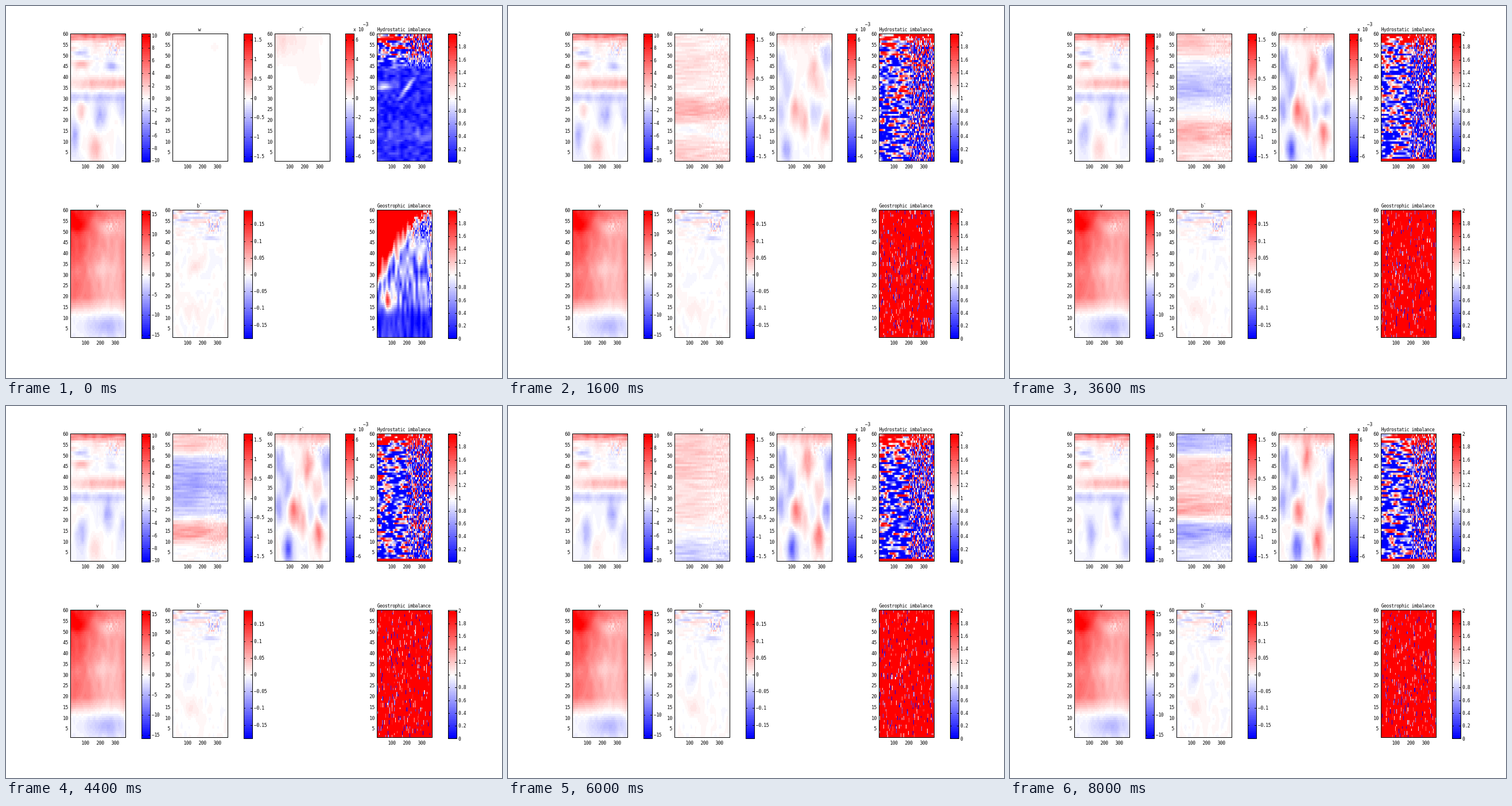
Write an HTML page with a canvas that moves like this. It is 864 px wide and 648 px high and loops after 8400 ms.

```html
<!DOCTYPE html>
<html lang="en">
<head>
<meta charset="utf-8">
<title>Model fields</title>
<style>
html, body { margin: 0; width: 100%; height: 100%; overflow: hidden; background: #fff; }
canvas { display: block; }
</style>
</head>
<body>
<canvas id="stage" width="864" height="648"></canvas>
<script>
const STEP = 400, COUNT = 21, W = 95, H = 59, TOP = 49, LOW = 356;
const ctx = document.getElementById('stage').getContext('2d');
const cell = document.createElement('canvas');
cell.width = W; cell.height = H;
const cellCtx = cell.getContext('2d');
const pixels = cellCtx.createImageData(W, H);

const clamp = (v, lo = -1, hi = 1) => Math.max(lo, Math.min(hi, v));
const ramp = (v, lo, hi) => clamp((v - lo) / (hi - lo), 0, 1);
const mix = (a, b, t) => a + (b - a) * t;
const bell = (d, r) => Math.exp(-((d / r) ** 2));
const bump = (dx, dy, rx, ry) => bell(dx, rx) * bell(dy, ry);

// Repeatable noise in -1..1
function hash(x, y, s) {
  let h = Math.imul(x, 374761393) ^ Math.imul(y, 668265263) ^ Math.imul(s + 1, 1274126177);
  h = Math.imul(h ^ (h >>> 13), 1103515245);
  h = Math.imul(h ^ (h >>> 15), 2246822519);
  return ((h ^ (h >>> 16)) >>> 0) / 2147483648 - 1;
}
function smooth(x, y, s) {
  const i = Math.floor(x), j = Math.floor(y), f = x - i, g = y - j;
  return mix(mix(hash(i, j, s), hash(i + 1, j, s), f), mix(hash(i, j + 1, s), hash(i + 1, j + 1, s), f), g);
}
// Horizontal runs, independent from row to row
function streak(x, row, len, s) {
  const p = x / len + hash(row, 7, s), i = Math.floor(p);
  return mix(hash(i, row, s), hash(i + 1, row, s), p - i);
}
// Upper right area of cell-sized speckle
const speckle = (x, row, lev, s) =>
  ramp(x, 56, 64) * ramp(-x, -88, -82) * ramp(lev, 49, 51) * ramp(-lev, -58, -55) * hash(x >> 1, row, s);

// Vertical motion at levels 5, 15 ... 55, by frame
const wave = [
  [0, [0, 0, 0, 0, 0, 0]],
  [2, [.05, -.2, .35, .3, .05, -.1]],
  [6, [.28, .22, .2, -.22, .2, .25]],
  [11, [0, .35, -.2, -.3, -.28, .2]],
  [13, [-.18, .3, .15, .25, .28, .3]],
  [17, [-.15, -.3, .12, -.02, .08, .05]],
  [20, [-.1, -.35, .3, .12, .25, -.25]]
];
function waveAt(lev, frame) {
  const n = Math.max(1, wave.findIndex(([at]) => at >= frame));
  const [t0, a] = wave[n - 1], [t1, b] = wave[n];
  const p = clamp((lev - 5) / 10, 0, 4.999), i = Math.floor(p), t = (frame - t0) / (t1 - t0);
  const ease = (1 - Math.cos((p - i) * Math.PI)) / 2;
  return mix(mix(a[i], b[i], t), mix(a[i + 1], b[i + 1], t), ease);
}

// Drifting anomalies: start x, level, end x, level, strength
const drift = [
  [64, 41, 48, 49, .42], [85, 50, 92, 44, -.42], [5, 46, 9, 47, -.36], [16, 35, 27, 37, -.3],
  [5, 23, 6, 29, -.34], [31, 24, 34, 23, .5], [13, 6, 31, 8, -.58], [84, 18, 67, 10, .52],
  [74, 36, 73, 32, .2], [72, 22, 89, 25, -.35]
];

const fields = {
  u(x, row, lev, f) {
    const t = f / 20, fade = 1 - t;
    const mean = .48 * bell(lev - 60, 3.2) + .26 * bell(lev - 37, 2.8) * ramp(x, -10, 30)
      - .18 * bell(lev - 30.5, 2.3) + .3 * bump(x - 18, lev - 46, 13, 2) - .22 * bump(x - 15, lev - 51, 13, 1.5)
      - .3 * fade * bump(x - 70, lev - 45, 11, 2)
      - .3 * bump(x - mix(52, 73, t), lev - 22, 10, 7) - .26 * bump(x - mix(6, 28, t), lev - 13, 9, 8)
      - .2 * bump(x - 90, lev - mix(26, 9, t), 8, 7) + .22 * fade * bump(x - 43, lev - 7, 13, 7)
      + .25 * fade * bump(x - 17, lev - 24, 7, 5);
    return mean * (1 + .25 * smooth(x / 5, row / 3, 3)) + .05 * smooth(x / 9, row / 6, 4)
      + .13 * ramp(lev, 43, 56) * streak(x, row, 18, 5) + .2 * speckle(x, row, lev, 6);
  },
  v(x, row, lev) {
    const left = bell(x, 42);
    const mean = ramp(lev, 11, 20) * (.25 + .32 * left + .1 * ramp(lev, 32, 45))
      + .3 * bump(x - 14, lev - 53, 15, 4) + .12 * left * bell(lev - 54, 6) + .14 * bell(lev - 59, 2.5)
      + .2 * bump(x - 94, lev - 28, 9, 12) - .2 * bump(x - 64, lev - 52, 16, 3)
      - .12 * bump(x - 52, lev - 33, 16, 4) - .24 * bump(x - 64, lev - 6.5, 28, 5) - .05 * ramp(-lev, -11, -8);
    return mean * (1 + .16 * smooth(x / 8, row / 6, 8)) + .03 * smooth(x / 5, row / 4, 9)
      + .1 * speckle(x, row, lev, 10);
  },
  w(x, row, lev, f) {
    if (!f) return .03 * bump(x - 72, lev - 54, 9, 2);
    return waveAt(lev, f) * (1.1 - .3 * ramp(x, 40, 60) + .2 * streak(x, row, 16, f))
      + .07 * streak(x, row, 22, f + 30) + .06 * ramp(x, 48, 65) * hash(x >> 1, row, f + 60);
  },
  r(x, row, lev, f) {
    const t = ramp(f, 2, 20), grow = ramp(f, 0, 7);
    let v = mix(.13 * bump(x, lev - 58, 55, 9) + .04 * bump(x - 60, lev - 43, 20, 7),
      .34 * bell(lev - 60, 4) * (.6 + .4 * ramp(x, 0, 50)), grow);
    for (const [x0, y0, x1, y1, a] of drift)
      v += grow * a * bump(x - mix(x0, x1, t), lev - mix(y0, y1, t), 8.5, 7);
    v += grow * (1 - t) * (.45 * bump(x - 46, lev - 20, 8, 7) - .28 * bump(x - 61, lev - 23, 6, 6));
    return v * (1 + .25 * smooth(x / 4, row / 5, 11)) + grow * (.07 * smooth(x / 6, row / 5, 12)
      + .1 * speckle(x, row, lev, 13));
  },
  b(x, row, lev, f) {
    const t = f / 20;
    return .07 * bump(x - 32, lev - 15, 14, 5) + .1 * (1 - ramp(f, 0, 2)) * bump(x - 2 * lev + 30, lev - 35, 10, 6)
      - .12 * t * bump(x - 30, lev - 28, 8, 4) - .2 * bump(x - 68, lev - 46.8, 15, 1.2)
      + .05 * mix(smooth(x / 7, row / 4, 15), smooth(x / 7, row / 4, 16), t)
      + .4 * ramp(lev, 52, 60) * streak(x, row, 15, 22) + .07 * ramp(lev, 42, 48) * streak(x, row, 10, 23)
      + .3 * speckle(x, row, lev, 24);
  },
  h(x, row, lev, f) {
    const fine = hash(row, x, 40 + f) < 2 * ramp(x, 48, 62) - 1;
    const n = fine ? hash(Math.floor(x / 1.5), row, 70 + f) : streak(x, row, 7, 70 + f);
    if (!f) {
      const ridge = bump(x - 2.6 * lev + 40, lev - 35, 5, 5) + bump(x - 14, lev - 35.5, 15, 1.6);
      return -.85 + .8 * ridge + .2 * bell(lev - 13, 3) + .22 * smooth(x / 7, row / 1.5, 41)
        + ramp(lev, 43, 53) * (.8 + 2 * n) + ramp(lev, 56, 60);
    }
    if (f > 4 && row === 0) return 1;
    return 1.8 * n - .5 + 1.6 * ramp(lev, 53, 59) + .35 * ramp(lev, 43, 53) - .2 * ramp(-lev, -16, -8);
  },
  g(x, row, lev, f) {
    if (!f) return -.85 + .4 * ramp(lev, 11, 17) + 2 * ramp(lev - 22 - .42 * x, 0, 15)
      + 1.3 * bump(x - 19, lev - 18, 6, 5) + .8 * ramp(lev, 54, 59)
      + (.25 + .4 * ramp(lev, 12, 18)) * smooth(x / 4, row / 6, 50)
      + .7 * ramp(x, 50, 62) * ramp(lev, 44, 50) * hash(x >> 1, row, 51)
      + .6 * ramp(x, 85, 91) * ramp(lev, 8, 18) * hash(x, row >> 1, 52);
    const rate = .09 + .08 * bump(x - 20 - f, lev - 38 + f, 14, 12);
    const n = (hash(x, Math.floor((row + hash(x, 1, f)) / 1.6), 80 + f) + 1) / 2;
    return n < rate ? 2.4 * n / rate - 1.3 : 1;
  }
};

function shade(v) {
  const q = Math.round(clamp(v) * 31) / 31, pale = Math.round(255 * (1 - Math.abs(q)));
  return [q < 0 ? pale : 255, pale, q > 0 ? pale : 255];
}

function paint(name, left, top, frame) {
  for (let row = 0; row < H; row++)
    for (let x = 0; x < W; x++)
      pixels.data.set([...shade(fields[name](x, row, row + 1.5, frame)), 255], ((H - 1 - row) * W + x) * 4);
  cellCtx.putImageData(pixels, 0, 0);
  ctx.drawImage(cell, left, top, W, 221);
  ctx.strokeRect(left - .5, top - .5, W + 1, 222);
}

function text(s, x, y, align = 'center') {
  ctx.textAlign = align;
  ctx.fillText(s, x, y);
}

function bar(x, top, [max, step, span, mid = 0]) {
  for (let i = 0; i < 64; i++) {
    ctx.fillStyle = `rgb(${shade((31.5 - i) / 31)})`;
    const y = Math.round(top + i * 223 / 64);
    ctx.fillRect(x, y, 15, Math.round(top + (i + 1) * 223 / 64) - y);
  }
  ctx.strokeRect(x - .5, top - .5, 15, 223.5);
  ctx.fillStyle = '#000';
  const count = Math.round(2 * (max - mid) / step);
  for (let i = 0; i <= count; i++) {
    const v = +(max - i * step).toFixed(2);
    const at = top + 111.5 - (v - mid) / span * 111.5, y = clamp(Math.round(at), top, top + 222);
    ctx.fillRect(x, y, 2, 1);
    ctx.fillRect(x + 11, y, 4, 1);
    text(String(v).replace('-', '−'), x + 17, Math.round(at) + 1, 'left');
  }
}

// Scale: highest tick, tick step, half range, middle
const panels = [
  { name: 'u', x: 113, y: TOP, title: '', scale: [10, 2, 10.23] },
  { name: 'w', x: 291, y: TOP, title: 'w', scale: [1.5, .5, 1.64] },
  { name: 'r', x: 469, y: TOP, title: 'r`', scale: [6, 2, 6.56] },
  { name: 'h', x: 647, y: TOP, title: 'Hydrostatic imbalance', scale: [2, .2, 1, 1] },
  { name: 'v', x: 113, y: LOW, title: 'v', scale: [15, 5, 15.9] },
  { name: 'b', x: 291, y: LOW, title: 'b`', scale: [.15, .05, .191] },
  { name: 'g', x: 647, y: LOW, title: 'Geostrophic imbalance', scale: [2, .2, 1, 1] }
];

function drawFrame(frame) {
  ctx.fillStyle = '#fff';
  ctx.fillRect(0, 0, 864, 648);
  ctx.imageSmoothingEnabled = false;
  ctx.strokeStyle = '#000';
  ctx.lineWidth = 1;
  ctx.font = '8px "DejaVu Sans Mono", monospace';
  ctx.letterSpacing = '-0.4px';
  ctx.textBaseline = 'middle';
  for (const { name, x, y, title, scale } of panels) {
    paint(name, x, y, frame);
    bar(x + (name === 'r' ? 123 : 124), y === LOW ? y + .5 : y, scale);
    text(title, x + 46, y - 7);
    for (let n = 5; n <= 60; n += 5) text(n, x - 5, y + 1 + (60 - n) * 3.75, 'right');
    for (let n = 1; n <= 3; n++) text(n * 100, x - 1 + n * 26, y + 232);
  }
  text('x 10', 605, 42, 'left');
  text('−3', 622, 33, 'left');
}

const start = performance.now();
let shown = -1;
function tick() {
  const frame = Math.floor((performance.now() - start) / STEP) % COUNT;
  if (frame !== shown) drawFrame(shown = frame);
  requestAnimationFrame(tick);
}
tick();
</script>
</body>
</html>
```
